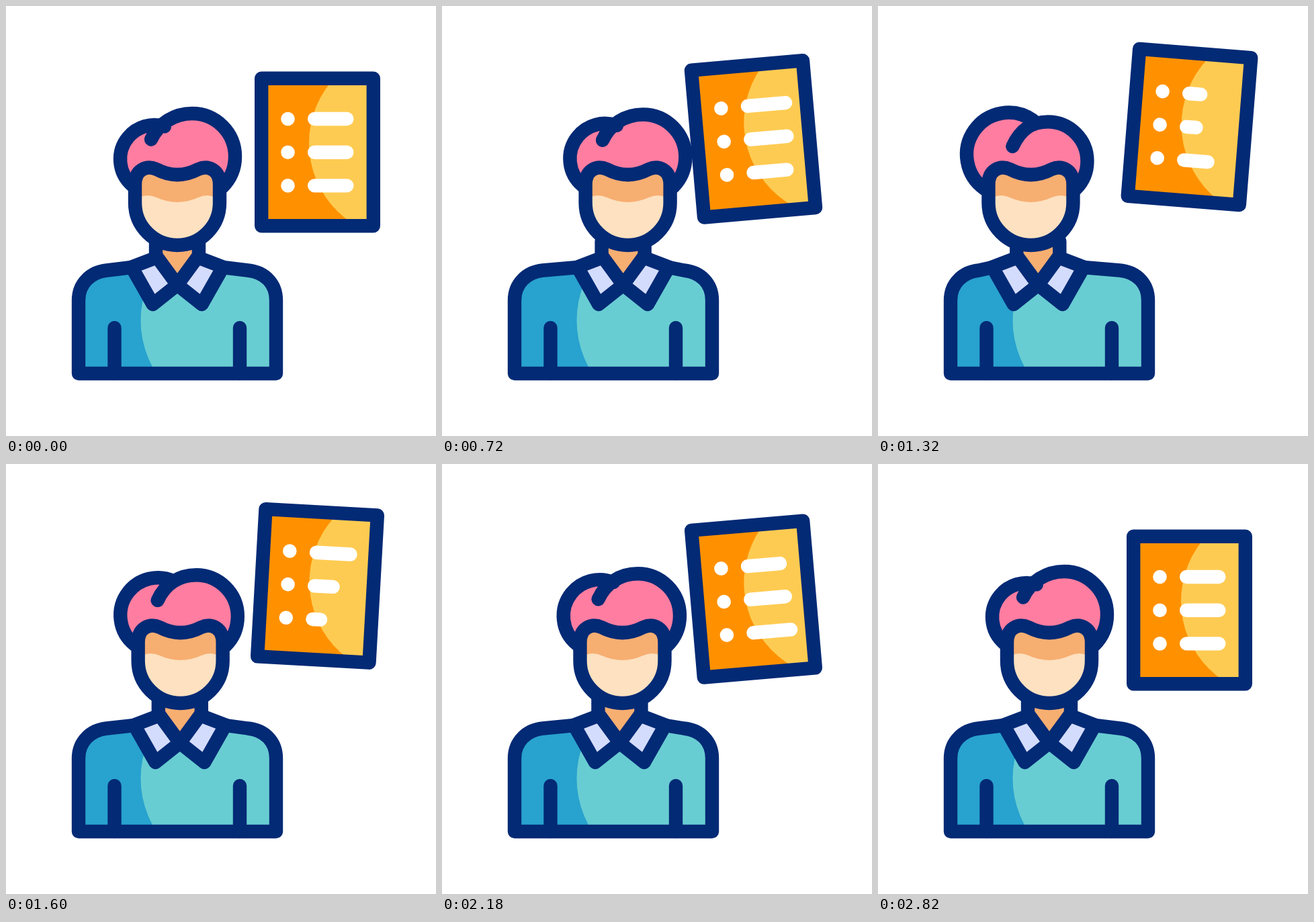
Write an HTML page with a canvas that moves like this. It is 640 px wide and 640 px high and loops after 3.02 s.

```html
<!DOCTYPE html>
<html lang="en">
<head>
<meta charset="utf-8">
<title>Person and list</title>
<style>
html, body { margin: 0; height: 100%; overflow: hidden; background: #fff; }
canvas { display: block; width: 100vw; height: 100vh; }
</style>
</head>
<body>
<canvas id="stage" width="640" height="640"></canvas>
<script>
const ctx = document.getElementById('stage').getContext('2d');
const NAVY = '#032a75', SKIN = '#f7ae71', RAD = Math.PI / 180;
const STEP = 20, LAST = 141, LOOP = 3020;

const lerp = (a, b, u) => a + (b - a) * u;

// Eased value between keys; times and values run in parallel.
function keyed(t, times, values) {
  if (t <= times[0]) return values[0];
  for (let i = 1; i < times.length; i++) {
    if (t < times[i]) {
      const u = (t - times[i - 1]) / (times[i] - times[i - 1]);
      return lerp(values[i - 1], values[i], u * u * (3 - 2 * u));
    }
  }
  return values[values.length - 1];
}

const SWAY = [0, 9.5, 19, 28.5, 38, 47.5, 57, 66.5, 76, 85, 94, 103, 112, 121.5, 131, 141];
// Alternates left and right, with its own rest value at both ends.
const sway = (t, left, right) => keyed(t, SWAY,
  SWAY.map((_, i) => i % 15 ? (i % 2 ? left : right) : 0));

const quarters = [0, 35.25, 70.5, 105.75, 141];
const barKeys = [9.6, 35, 60.4, 85.8, 111.2];

function fill(path, color) {
  ctx.fillStyle = color;
  ctx.fill(path);
}

function stroke(path, color = NAVY) {
  ctx.strokeStyle = color;
  ctx.stroke(path);
}

function disc(x, y, r, color) {
  const p = new Path2D();
  p.arc(x, y, r, 0, 7);
  fill(p, color);
}

function clipped(path, draw) {
  ctx.save();
  ctx.clip(path);
  draw();
  ctx.restore();
}

function shifted(dx, draw) {
  ctx.save();
  ctx.translate(dx, 0);
  draw();
  ctx.restore();
}

function drawSheet(t) {
  ctx.save();
  ctx.translate(463.5, 217.5 + keyed(t, [0, 70.5, 141], [0, -38, 0]));
  ctx.rotate(keyed(t, quarters, [0, -5, 5, -5, 0]) * RAD);
  ctx.translate(-463.5, -217.5);
  const sheet = new Path2D('M380.2 107.7H546.8V327.3H380.2Z');
  fill(sheet, '#ff9100');
  clipped(sheet, () => disc(594, 204, 143, '#fecb52'));
  stroke(sheet);
  for (let i = 0; i < 3; i++) {
    const y = 168 + i * 49.7;
    const len = keyed(t - i * 9.4, barKeys, [68.5, 77, 32, 77, 68.5]);
    disc(419.5, y, 10.3, '#fff');
    stroke(new Path2D(`M459.2 ${y}H${449 + len - 10.2}`), '#fff');
  }
  ctx.restore();
}

function drawBody(shift) {
  const body = new Path2D(`M108 547V438C108 413 126 396 150 393.5L${187 + shift} 389
    L${255 + shift} 415L${323 + shift} 389L360 393.5C385 396 402 413 402 438V547Z`);
  fill(body, '#28a2ce');
  clipped(body, () => disc(345.5, 468, 145, '#68cdd2'));
  stroke(body);
  stroke(new Path2D('M161.5 479V547M348 479V547'));
  shifted(shift, () => {
    fill(new Path2D('M223 345H287V374L255 415L223 374Z'), SKIN);
    stroke(new Path2D('M223 350V374M287 350V374'));
    const collar = new Path2D(`M187 388.5L225 374L255 415L218.5 444Z
      M323 388.5L285 374L255 415L291.5 444Z`);
    fill(collar, '#d4dcfd');
    stroke(collar);
  });
}

// lean 0: right lobe is full; lean 1: left lobe swells, right one shrinks.
function drawHead(lean) {
  const lx = lerp(221, 222, lean), ly = lerp(228, 221, lean), lr = lerp(51, 62.5, lean);
  const rx = lerp(277, 280.5, lean), ry = lerp(224, 231, lean), rr = lerp(64, 58.5, lean);
  const tipX = lerp(216, 228, lean), tipY = lerp(198.5, 209, lean);
  disc(lx, ly, lr, '#ff7da0');
  disc(rx, ry, rr, '#ff7da0');

  const face = new Path2D(`M192 265C192 245 208 236 224 243C245 254 265 254 286 243
    C302 236 318 245 318 265V293A63 63 0 0 1 192 293Z`);
  fill(face, SKIN);
  clipped(face, () => fill(new Path2D(`M190 290Q206 277 224 285Q255 299 286 285
    Q304 277 320 290V370H190Z`), '#fde1c0'));
  stroke(face);

  const hair = new Path2D();
  hair.arc(lx, ly, lr, lerp(130, 125, lean) * RAD, lerp(287, 307, lean) * RAD);
  hair.moveTo(tipX, tipY);
  hair.bezierCurveTo(tipX + 11, tipY - 24, rx - 26, ry - rr, rx, ry - rr);
  hair.arc(rx, ry, rr, -90 * RAD, 45 * RAD);
  stroke(hair);
}

function frame(now) {
  const t = Math.min(Math.floor(now % LOOP / STEP), LAST);
  ctx.fillStyle = '#fff';
  ctx.fillRect(0, 0, 640, 640);
  ctx.lineWidth = 20.4;
  ctx.lineCap = ctx.lineJoin = 'round';
  drawSheet(t);
  drawBody(sway(t, -17, 18.7));
  shifted(sway(t, -28, 28), () => drawHead(sway(t, 1, 0)));
  requestAnimationFrame(() => frame(performance.now() - start));
}

const start = performance.now();
frame(0);
</script>
</body>
</html>
```
